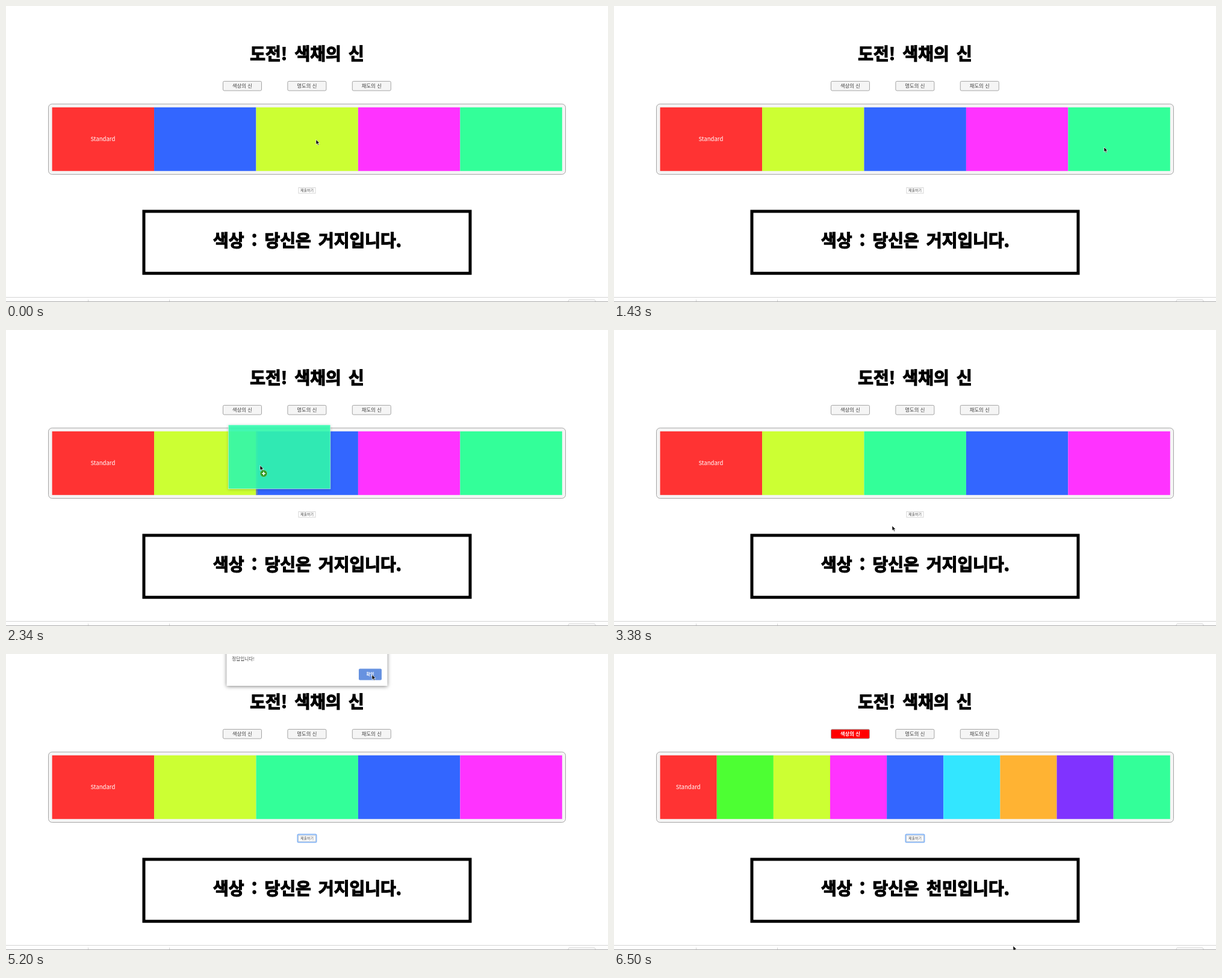
An HTML page that plays this animation: 1000 px wide and 493 px high, repeating every 6630 ms.

```html
<!DOCTYPE html>
<html lang="ko">
<head>
<meta charset="utf-8">
<title>도전! 색채의 신</title>
<style>
html, body { margin: 0; width: 100%; height: 100%; overflow: hidden; background: #fff; }
svg { display: block; width: 100%; height: 100%; }
text { font-family: "Noto Sans CJK KR", "Noto Sans CJK", "Noto Sans", sans-serif; text-anchor: middle; fill: #444; }
.heavy { font-size: 28px; font-weight: 900; word-spacing: 4.5px; fill: #000; stroke: #000; stroke-width: 1.3; }
.tab { font-size: 8.4px; }
.tab rect { fill: #f5f5f5; stroke: #a4a4a4; }
.tab.on rect { fill: #f00; }
.tab.on text { fill: #fff; font-weight: 700; }
#standard { font-size: 9.6px; font-weight: 500; fill: #fff; }
#ghost { fill-opacity: .88; stroke: #fff; stroke-opacity: .5; filter: drop-shadow(0 1px 2px rgba(0, 0, 0, .25)); }
#panel { filter: drop-shadow(0 1px 3px rgba(0, 0, 0, .5)); }
</style>
</head>
<body>
<svg viewBox="0 0 1000 493" preserveAspectRatio="none">
  <text class="heavy" x="500" y="90">도전! 색채의 신</text>
  <g id="tabs"></g>

  <rect x="70.5" y="163.2" width="859" height="117.2" rx="6" fill="#f5f5f5" stroke="#a4a4a4"/>
  <g id="tiles"></g>
  <rect id="marker" y="168.8" width="2.5" height="106" fill="#6c7fb0"/>
  <text id="standard" y="225">Standard</text>

  <rect id="ring" x="484.5" y="300.5" width="31" height="13" rx="1.5" fill="none" stroke="#86b5f5" stroke-width="2"/>
  <rect x="486" y="302.5" width="28" height="9.5" fill="#fff" stroke="#ccc" stroke-width=".8"/>
  <text x="500" y="309.3" font-size="6">제출하기</text>

  <rect x="229" y="342" width="542" height="103.2" fill="#fff" stroke="#000" stroke-width="5"/>
  <text id="result" class="heavy" x="500.5" y="401"></text>

  <path d="M0 485.3H1000M136.5 489V492M271.5 489V492" stroke="#d0d0d0"/>
  <path d="M934 492V491Q934 489.5 936 489.5H977Q979 489.5 979 491V492" fill="none" stroke="#d0d0d0"/>
  <path d="M0 492.5H1000" stroke="#aaa"/>

  <g id="alert">
    <rect id="panel" x="366.5" y="-10" width="267" height="63" fill="#fff"/>
    <text x="394" y="11" font-size="7.6">정답입니다!</text>
    <rect x="586" y="24.5" width="38" height="19" rx="2" fill="#6792e0"/>
    <text x="605" y="36.4" font-size="7" font-weight="700" style="fill:#fff">확인</text>
  </g>

  <rect id="ghost" width="169.5" height="106.5"/>
  <g id="cursor">
    <path d="M0 0V8.2L1.9 6.5L3.3 9.5L4.7 8.9L3.4 6H6Z" stroke="#fff" stroke-width=".7"/>
    <g id="plus">
      <circle cx="6" cy="13.5" r="5.6" fill="#2c9a20" stroke="#8bc684" stroke-width=".6"/>
      <path d="M3 13.5H9M6 10.5V16.5" stroke="#fff" stroke-width="1.6"/>
    </g>
  </g>
</svg>
<script>
const LOOP = 6630, STEP = 130, LAG = 35;
const LEFT = 76.6, TOP = 168.8, WIDTH = 847.2, HEIGHT = 106;
const SUBMIT = 4290, CONFIRM = 5330;

const drags = [
  { from: 780, to: 1170, grab: [60, 54], hue: 225 },
  { from: 1560, to: 2470, grab: [59.5, 66.5], hue: 157 }
];

// each pointer move: start time, end time, place reached (it rests in between)
const moves = [
  [0, 0, 515, 222.5],
  [0, 650, 306, 222.5],
  [780, 1430, 814, 235],
  [1560, 1690, 640, 196],
  [1690, 1820, 524, 211.5],
  [1820, 2340, 422, 225.5],
  [2470, 3380, 462, 326],
  [3380, 3770, 498, 307],
  [4290, 5200, 608, 34.5],
  [CONFIRM, 6500, 663, 486]
];

const $ = id => document.getElementById(id);
const show = (id, on) => $(id).style.display = on ? '' : 'none';
const set = (id, attrs) => {
  for (const name in attrs) $(id).setAttribute(name, attrs[name]);
};

$('tabs').innerHTML = ['색상의 신', '명도의 신', '채도의 신'].map((label, i) =>
  `<g class="tab" transform="translate(${360.5 + i * 107.4} 125.4)">
    <rect width="64" height="15.6" rx="2"/><text x="32" y="10.8">${label}</text></g>`).join('');

function cursorAt(t) {
  let x = 0, y = 0;
  for (const [from, to, toX, toY] of moves) {
    if (t < from) break;
    const k = Math.min(1, (t - from) / (to - from || 1) + (to === from));
    x += (toX - x) * k;
    y += (toY - y) * k;
    if (k < 1) break;
  }
  return [x, y];
}

// one digit per tile, in steps of 37.5 degrees of hue
const orderAt = t =>
  t >= CONFIRM ? '032865174' : t >= drags[1].to ? '02468' : t >= drags[0].to ? '02684' : '06284';

function draw(t) {
  const [x, y] = cursorAt(t);
  const order = orderAt(t), w = WIDTH / order.length;
  $('tiles').innerHTML = [...order].map((n, i) =>
    `<rect x="${LEFT + i * w}" y="${TOP}" width="${w}" height="${HEIGHT}" fill="hsl(${n * 37.5},100%,60%)"/>`).join('');
  set('standard', { x: LEFT + w / 2 - .4 });

  const drag = drags.find(d => t >= d.from && t < d.to);
  for (const id of ['ghost', 'plus', 'marker']) show(id, drag);
  if (drag) {
    const [gx, gy] = cursorAt(t - LAG); // the dragged copy trails the pointer
    set('ghost', { x: gx - drag.grab[0], y: gy - drag.grab[1], fill: `hsl(${drag.hue},100%,60%)` });
    set('marker', { x: LEFT + Math.floor((x - LEFT) / w) * w });
  }

  const won = t >= CONFIRM;
  show('ring', t >= SUBMIT);
  show('alert', t >= SUBMIT && !won);
  $('tabs').firstElementChild.classList.toggle('on', won);
  $('result').textContent = `색상 : 당신은 ${won ? '천민' : '거지'}입니다.`;
  set('cursor', { transform: `translate(${x} ${y})` });
}

let last = -1;
const start = performance.now();
function tick(now) {
  const t = Math.floor(Math.max(0, now - start) % LOOP / STEP) * STEP;
  if (t !== last) draw(last = t);
  requestAnimationFrame(tick);
}
tick(start);
</script>
</body>
</html>
```
